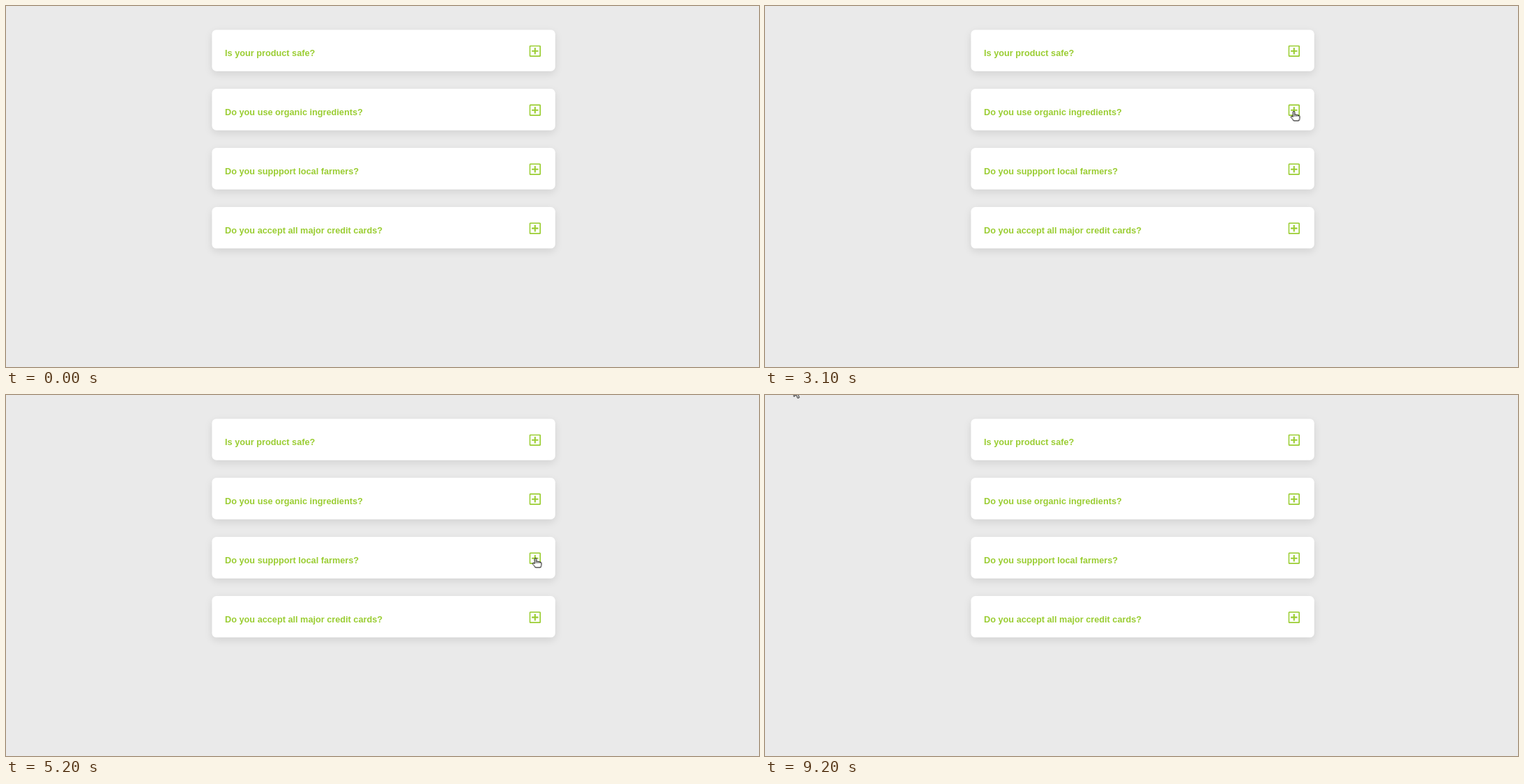
Write an HTML page that moves like this. It is 1080x519 px and loops after 9500 ms.

```html
<!DOCTYPE html>
<html lang="en">
<head>
<meta charset="utf-8">
<title>Questions</title>
<style>
  html, body { margin: 0; width: 100%; height: 100%; overflow: hidden; background: #eaeaea; }

  .page {
    position: absolute; left: 0; top: 0; width: 1360px;
    transform: scale(.79412); transform-origin: 0 0;
    font: 16px/18px "Liberation Sans", Arial, sans-serif;
  }
  .cards { position: absolute; left: 371.5px; top: 43px; width: 620px; }

  .card {
    --open: 0;
    position: relative; overflow: hidden;
    height: calc(75px + var(--open) * 115px);
    margin-bottom: 32px; border-radius: 8px;
    background: #fff; box-shadow: 0 5px 15px rgba(0, 0, 0, .1);
    animation: 9.5s step-end infinite;
  }
  .card:nth-child(1) { animation-name: open-1; }
  .card:nth-child(2) { animation-name: open-2; }
  .card:nth-child(3) { animation-name: open-3; }
  .card:nth-child(4) { animation-name: open-4; }

  .card h5, .card p { position: absolute; left: 24px; margin: 0; white-space: nowrap; }
  .card h5 { top: 33.5px; font-size: 16px; color: #9acd32; }
  .card p { top: 75px; width: 572px; padding-top: 16px; border-top: 1px solid gray; color: gray; }
  .icon { position: absolute; left: 573.5px; top: 28.3px; width: 21px; height: 21px; fill: #9acd32; }
  .icon .frame { fill: none; stroke: #9acd32; stroke-width: 2.25; }
  .icon .upright { opacity: calc(1 - var(--open)); }

  .cursor {
    --hand: 0;
    position: absolute; left: 0; top: 0; width: 1px; height: 1px; overflow: visible;
    fill: #fff; stroke: #000; stroke-linejoin: round;
    animation: move 9.5s step-end infinite, shape 9.5s step-end infinite;
  }
  .arrow { opacity: calc(1 - var(--hand)); }
  .hand { opacity: var(--hand); }

  @keyframes open-1 { 0% { --open: 0 } 10.526% { --open: 1 } 23.157% { --open: 0 } }
  @keyframes open-2 { 0% { --open: 0 } 34.736% { --open: 1 } 41.052% { --open: 0 } }
  @keyframes open-3 { 0% { --open: 0 } 49.473% { --open: 1 } 54.736% { --open: 0 } }
  @keyframes open-4 { 0% { --open: 0 } 64.210% { --open: 1 } 72.631% { --open: 0 } }

  /* The pointer advances once every 100 ms. */
  @keyframes move {
    0%, 2.105% { transform: translate(650px, 19px); }
    2.105% { animation-timing-function: steps(4); }
    6.315% { transform: translate(740px, 56px); animation-timing-function: steps(4); }
    10.526% { transform: translate(755px, 63.5px); }
    13.684% { transform: translate(755px, 63.5px); animation-timing-function: steps(4); }
    17.894% { transform: translate(763px, 85px); animation-timing-function: steps(3); }
    21.052% { transform: translate(755.5px, 64px); }
    23.157% { transform: translate(755.5px, 64px); animation-timing-function: steps(2); }
    25.263% { transform: translate(762px, 133px); }
    27.368% { transform: translate(762px, 133px); animation-timing-function: steps(3); }
    30.526% { transform: translate(772px, 169px); animation-timing-function: steps(2); }
    32.631% { transform: translate(758.5px, 151px); }
    41.052% { transform: translate(750.5px, 220.5px); animation-timing-function: steps(6); }
    47.368% { transform: translate(759.5px, 234px); }
    54.736% { transform: translate(759.5px, 234px); animation-timing-function: steps(6); }
    61.052% { transform: translate(758.5px, 323px); }
    73.684% { transform: translate(758.5px, 323px); animation-timing-function: steps(2); }
    75.789% { transform: translate(746.5px, 299.5px); }
    94.736% { transform: translate(41.5px, -13px); }
    96.842%, 100% { transform: translate(41.5px, -11px); }
  }
  @keyframes shape {
    0% { opacity: 0; --hand: 0; }
    2.105% { opacity: 1; --hand: 0; }
    9.473% { opacity: 1; --hand: 1; }
    15.789% { opacity: 1; --hand: 0; }
    20% { opacity: 1; --hand: 1; }
    24.210% { opacity: 1; --hand: 0; }
    32.631% { opacity: 1; --hand: 1; }
    41.052% { opacity: 1; --hand: 0; }
    44.210% { opacity: 1; --hand: 1; }
    55.789% { opacity: 1; --hand: 0; }
    61.052% { opacity: 1; --hand: 1; }
    75.789% { opacity: 1; --hand: 0; }
    77.894% { opacity: 0; --hand: 0; }
    94.736%, 100% { opacity: 1; --hand: 0; }
  }
</style>
</head>
<body>
<div class="page"><div class="cards"></div></div>

<svg class="cursor">
  <path class="arrow" d="M0 0V13.4L3.1 10.5 5.5 15.6 7.7 14.6 5.4 9.7H9.8Z"/>
  <g class="hand">
    <path d="M-1.2 8.5V1.5Q-1.2 .5 0 .5T1.2 1.5V5.2Q2.4 4.4 3.6 5.6Q4.8 4.9 6 6.2Q8.4 5.6 8.4 8V10.5Q8.2 12 7.2 14H-.4Q-1.2 12 -4 9.2Q-4.6 7.6 -3.2 7.4Q-2.2 7.4 -1.2 8.5Z"/>
    <path d="M1.2 5.2V8M3.6 5.6V8M6 6.2V8" stroke-width=".8"/>
  </g>
</svg>

<script>
  const questions = [
    "Is your product safe?",
    "Do you use organic ingredients?",
    "Do you suppport local farmers?",
    "Do you accept all major credit cards?"
  ];
  const answer = [
    "Lorem ipsum dolor sit amet consectetur, adipisicing elit. Commodi libero dolorem",
    "repellendus ea itaque fugit vel temporibus blanditiis, nulla accusamus",
    "exercitationem soluta quam corrupti error ipsam. Saepe laborum quo totam!"
  ].join("<br>");

  document.querySelector(".cards").innerHTML = questions.map(question => `
    <article class="card">
      <h5>${question}</h5>
      <svg class="icon" viewBox="0 0 21 21">
        <rect class="frame" x="1.125" y="1.125" width="18.75" height="18.75" rx="1.2"/>
        <rect x="4.5" y="9.2" width="12" height="2.6" rx=".5"/>
        <rect class="upright" x="9.2" y="4.5" width="2.6" height="12" rx=".5"/>
      </svg>
      <p>${answer}</p>
    </article>`).join("");
</script>
</body>
</html>
```
